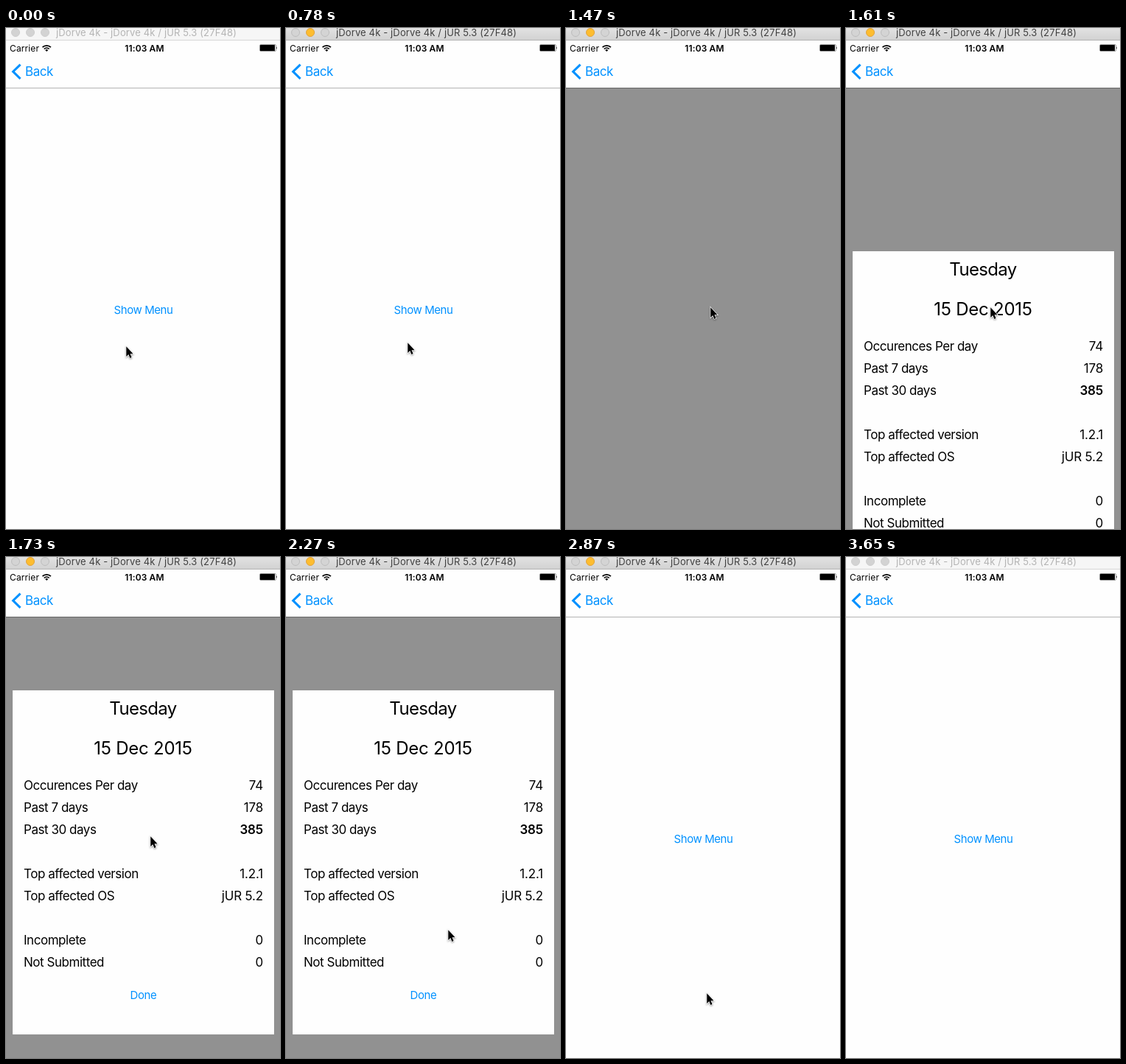
Recreate the animation shown at these times as an HTML page. Size 372 px wide and 680 px high, loop 3690 ms.

```html
<!DOCTYPE html>
<html lang="en">
<head>
<meta charset="utf-8">
<title>Menu sheet</title>
<style>
  html, body { margin: 0; width: 100%; height: 100%; overflow: hidden; background: #fefefe; }
  svg { display: block; width: 100vw; height: 100vh; }
  text { font: 17px Inter, "Open Sans", sans-serif; letter-spacing: -.027em; white-space: pre; }
  .status text { font-size: 12px; letter-spacing: .01em; }
  .status .clock { font-weight: 600; }
  .link { fill: #0091ff; }
  .button { font-size: 15px; }
  .mid { text-anchor: middle; }
  .end { text-anchor: end; letter-spacing: -.01em; }
  .heading { font-size: 24px; }
  .date { letter-spacing: -.01em; }
  #caption { font-size: 13px; letter-spacing: .01em; fill: #404040; }
  #lights circle { fill: #d4d4d4; stroke: #bdbdbd; }
  #lights .amber { fill: #fdbd30; stroke: #e2a23a; }
  #bar { fill: url(#metal); }
  #edge { fill: #b4b4b4; }
  .inactive #caption { fill: #b4b4b4; }
  .inactive #lights circle { fill: #d3d3d3; stroke: #cdcdcd; }
  .inactive #bar { fill: #f6f6f6; }
  .inactive #edge { fill: #d6d6d6; }
  #cursor { filter: drop-shadow(0 1px 1px rgba(0, 0, 0, .4)); }
</style>
</head>
<body>
<svg viewBox="0 0 372 680">
  <linearGradient id="metal" x2="0" y2="1">
    <stop stop-color="#e2e2e2"/><stop offset="1" stop-color="#d2d2d2"/>
  </linearGradient>
  <rect width="372" height="680" fill="#fefefe"/>

  <g id="titlebar">
    <rect id="bar" width="372" height="16"/>
    <rect id="edge" y="16" width="372" height="1"/>
    <g id="lights">
      <circle cx="13" cy="6" r="5.5"/>
      <circle class="amber" cx="33" cy="6" r="5.5"/>
      <circle cx="53" cy="6" r="5.5"/>
    </g>
    <text id="caption" x="68" y="11">jDorve 4k - jDorve 4k / jUR 5.3 (27F48)</text>
  </g>

  <g class="status">
    <text x="5" y="31.5">Carrier</text>
    <path d="M49.5 26.2a8 8 0 0 1 11.4 0M51.7 28.5a5 5 0 0 1 7 0" fill="none" stroke="#000" stroke-width="1.7"/>
    <path d="M53.2 30a2.9 2.9 0 0 1 4 0l-2 2.1z"/>
    <text class="clock mid" x="188" y="31.5">11:03 AM</text>
    <rect x="344.5" y="22.5" width="22" height="9" rx="1.5" fill="none" stroke="#999"/>
    <rect x="345" y="23" width="20" height="8" rx=".5"/>
    <path d="M367.3 25.2q1.6 1.8 0 3.6z"/>
  </g>

  <path d="M19.5 49.6L9.6 59.2l9.9 9.6" fill="none" stroke="#0091ff" stroke-width="3"/>
  <text class="link" x="26" y="65">Back</text>
  <rect y="81" width="372" height="1" fill="#b4b4b4"/>

  <text id="show" class="link button mid" x="186.5" y="388">Show Menu</text>

  <g id="modal">
    <rect y="81" width="372" height="599" fill-opacity=".43"/>
    <g id="sheet">
      <rect x="9" width="355" height="467" fill="#fefefe"/>
      <text class="heading mid" x="186" y="33">Tuesday</text>
      <text class="heading date mid" x="186" y="87">15 Dec 2015</text>
      <g id="rows"></g>
      <text id="done" class="link button mid" x="186.5" y="418.5">Done</text>
    </g>
  </g>

  <path id="cursor" d="M.3 .3V14L3.3 11.1 5.4 15.9 7.6 15 5.5 10.2H9.6z" stroke="#fff" stroke-width="1.4" paint-order="stroke"/>
</svg>
<script>
const LOOP = 3690, PRESS = 1360, OPEN = 1470, OPENED = 1730, CLOSE = 2500, CLOSED = 2870;
const SHEET_TOP = 181, SHEET_TRAVEL = 499, PRESSED_OPACITY = .15;
const $ = id => document.getElementById(id);

// label, value, row slot
const rows = [
  ['Occurences Per day', '74', 0],
  ['Past 7 days', '178', 1],
  ['Past 30 days', '385', 2],
  ['Top affected version', '1.2.1', 4],
  ['Top affected OS', 'jUR 5.2', 5],
  ['Incomplete', '0', 7],
  ['Not Submitted', '0', 8]
];
$('rows').innerHTML = rows.map(([label, value, slot]) => {
  const y = 135 + 30 * slot;
  const weight = value === '385' ? 600 : 400;
  return `<text x="24" y="${y}">${label}</text>
    <text class="end" x="349" y="${y}" style="font-weight:${weight}">${value}</text>`;
}).join('');

// The picture is refreshed only at these moments.
const steps = (from, to, count) =>
  Array.from({ length: count }, (_, i) => from + (to - from) * i / (count - 1));
const ticks = [
  0, 480, ...steps(780, 1240, 10),
  PRESS, OPEN, 1560, 1610, 1670, OPENED,
  ...steps(1940, 2410, 11), ...steps(CLOSE, CLOSED, 6),
  ...steps(3020, 3370, 7), 3650
];

// time, x, y of the pointer tip
const route = [
  [730, 163, 432], [1050, 200, 351], [1240, 196, 379],
  [1890, 196, 379], [2080, 235, 227], [2270, 220, 506], [2363, 192, 597], [2410, 191, 592],
  [2960, 191, 592], [3370, 336, 684]
];

function pointerAt(time) {
  const next = route.findIndex(stop => stop[0] > time);
  if (next === 0) return route[0].slice(1);
  if (next < 0) return route.at(-1).slice(1);
  const [t0, x0, y0] = route[next - 1], [t1, x1, y1] = route[next];
  const p = (time - t0) / (t1 - t0), eased = p * p * (3 - 2 * p);
  return [x0 + (x1 - x0) * eased, y0 + (y1 - y0) * eased];
}

function sheetOffset(time) {
  if (time < OPENED) return (1 - (time - OPEN) / (OPENED - OPEN)) ** 1.82;
  return Math.max(0, (time - CLOSE) / (CLOSED - CLOSE)) ** 1.6;
}

function draw() {
  const clock = performance.now() % LOOP;
  const time = ticks.findLast(tick => tick <= clock);
  const modal = time >= OPEN && time < CLOSED;

  $('titlebar').setAttribute('class', time < 480 || time >= 3650 ? 'inactive' : '');
  $('show').setAttribute('opacity', modal ? 0 : time === PRESS ? PRESSED_OPACITY : 1);
  $('modal').setAttribute('display', modal ? 'inline' : 'none');
  if (modal) {
    const top = Math.round(SHEET_TOP + SHEET_TRAVEL * sheetOffset(time));
    $('sheet').setAttribute('transform', `translate(0 ${top})`);
    $('done').setAttribute('opacity', time >= CLOSE ? PRESSED_OPACITY : 1);
  }
  const [x, y] = pointerAt(time).map(Math.round);
  $('cursor').setAttribute('transform', `translate(${x} ${y})`);
  $('cursor').setAttribute('display', time >= 3370 ? 'none' : 'inline');
  requestAnimationFrame(draw);
}
draw();
</script>
</body>
</html>
```
